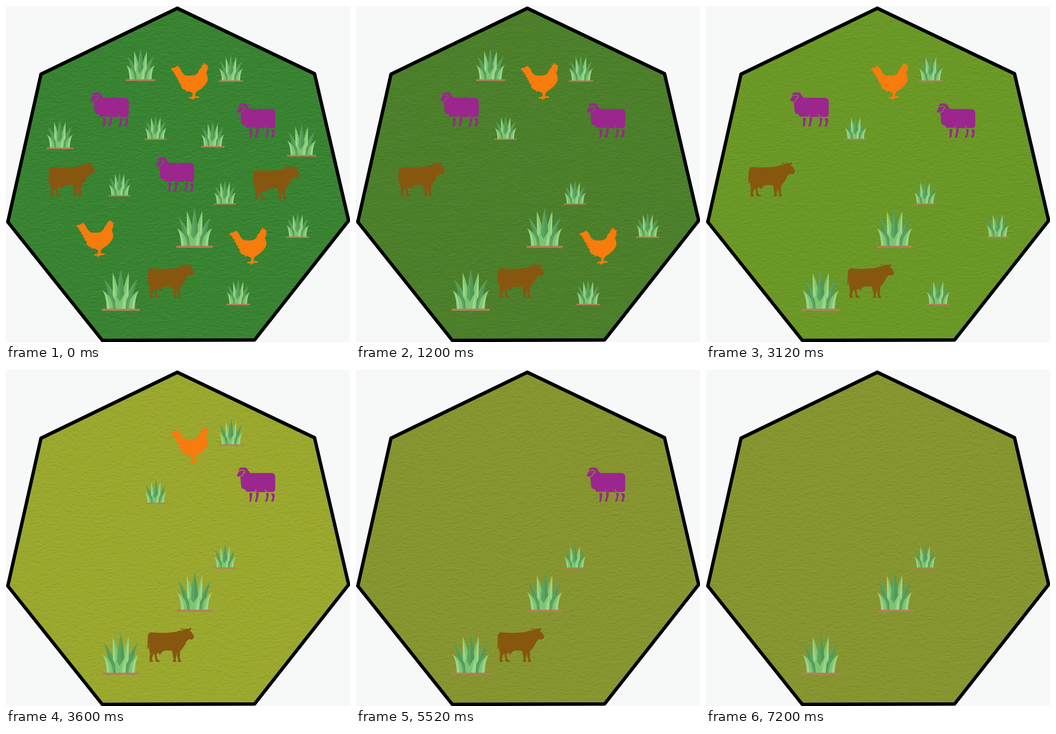
An HTML page with a canvas that plays this animation: 757 px wide and 739 px high, repeating every 8 s.

```html
<!DOCTYPE html>
<html lang="en">
<head>
<meta charset="utf-8">
<title>Pasture</title>
<style>
html, body { margin: 0; width: 100%; height: 100%; overflow: hidden; background: #f7f9f9; }
canvas { display: block; }
</style>
</head>
<body>
<canvas id="stage" width="757" height="739"></canvas>
<script>
const W = 757, H = 739, LOOP = 8000, STEP = 1200;
const canvas = document.getElementById('stage');
const ctx = canvas.getContext('2d');

const field = new Path2D('M377 5L679 149L754 472L547 734.5L212 735.5L4 475L77 150Z');
const stages = [
  { ground: '#388431', level: 0, relief: 1 },
  { ground: '#4c802a', level: 1, relief: 0.85 },
  { ground: '#6b9926', level: 2, relief: 0.85 },
  { ground: '#9ba92e', level: 3, relief: 0.9 },
  { ground: '#87962f', level: 4, relief: 0.9 },
  { ground: '#7b8732', level: 5, relief: 0.7 },
  { ground: '#87962f', level: 4, relief: 0.9 }
];

const species = {
  sheep: {
    color: '#9b268e',
    body: new Path2D(`M0 18L4 10L5 4Q7 0 11 0L19 0Q23 1 25 6L30 12H77Q85 13 85 21V47
      Q85 54 78 54H26Q19 54 19 48Q12 48 10 42L9 28L8 20L4 20Z
      M28 56H35L34 63L32 75H28L29 66Z M43 55H49L48 62L45 75H40L43 65Z
      M65 55L71 57L70 64L67 75H62L66 66Z M76 57H83L84 63L81 75H76L79 66Z`),
    gaps: new Path2D(`M4 8Q10 5 16 6Q20 8 17 12Q13 11 14 16Q12 19 8 20
      M20 54H36Q42 54 43 48 M62 48Q64 54 70 55H85`)
  },
  chicken: {
    color: '#f67c0d',
    body: new Path2D(`M0 15L4 11L8 11L14 7L18 8L22 14L25 20Q29 27 36 28L48 28Q57 27 60 22
      L63 15L68 10L69 7L68 4L72 5L72 1L74 0L76 4L79 1L79 7L83 4L82 10L81 12L84 15L80 16
      L81 21L78 21L80 26Q84 35 80 43L74 51L66 58L58 63L55 67L54 74L58 73L64 75L63 77L56 77
      L53 79L50 79L50 81L47 81L46 78L40 79L40 76L48 74L49 67L40 62L36 64L33 60L27 58
      L22 50L25 49L18 43L20 41L14 36L17 35L10 29L13 28L7 23L9 21L4 20L7 18Z`)
  },
  cow: {
    color: '#875710',
    body: new Path2D(`M1 24Q0 13 8 11L25 12L43 12L62 10L71 7L79 7L78 5L73 4L75 1L79 4L87 3
      L93 3L94 0L97 2L95 6L93 8L98 11L100 15L103 19L102 24L98 27L92 26L86 31L82 40L75 49
      L72 53L72 62L71 66L74 74L75 76H67L68 73L66 64L65 56L64 64L62 69L64 74L62 76H55
      L58 71L56 59L54 51L39 51L32 54L31 58L29 57L28 60L26 59L25 56L23 56L20 60L22 69
      L25 73L28 74L28 76H20L18 73L17 65L15 57L12 63L10 69L12 74L13 76H5L5 65L6 58L4 49
      L3 35L3 43L2 47L0 46Z`)
  }
};

// kind, x, y, last stage in which it is seen
const animals = [
  ['sheep', 185, 190, 2], ['sheep', 507.5, 214.5, 4], ['sheep', 329, 333, 0],
  ['chicken', 362, 125, 3], ['chicken', 154, 470.5, 0], ['chicken', 491, 487.5, 1],
  ['cow', 93, 343, 2], ['cow', 543, 350, 0], ['cow', 311, 566, 4]
];
// left, ground line, width, last level at which it grows
const tufts = [
  [263.5, 163, 65, 1], [468, 165, 54, 3], [305, 293, 49, 3], [429, 309.5, 52, 0],
  [89, 313, 59, 0], [618, 329.5, 65, 0], [225.5, 417.5, 49, 0], [457.5, 435.5, 49, 4],
  [375, 529.5, 80, 4], [616.5, 508.5, 51, 2], [485, 656.5, 52, 2], [211, 668, 83, 4]
];

const LIGHT = '#9bd68a', MID = '#7cc771', DARK = '#5ba461', DEEP = '#539858';

function halfBlade(side, base, width, bendX, bendY, tipX, tipY, color) {
  const edge = side * width / 2;
  ctx.fillStyle = color;
  ctx.beginPath();
  ctx.moveTo(base + edge, 0);
  ctx.quadraticCurveTo(bendX + edge, bendY, tipX, tipY);
  ctx.quadraticCurveTo(bendX, bendY, base, 0);
  ctx.fill();
}

function blade(base, width, bendX, bendY, tipX, tipY, left, right) {
  halfBlade(-1, base, width, bendX, bendY, tipX, tipY, left);
  halfBlade(1, base, width, bendX, bendY, tipX, tipY, right);
}

function mirrored(base, width, bendX, bendY, tipX, tipY, outer, inner) {
  blade(base, width, bendX, bendY, tipX, tipY, outer, inner);
  blade(80 - base, width, 80 - bendX, bendY, 80 - tipX, tipY, inner, outer);
}

function drawTuft([x, y, width]) {
  ctx.save();
  ctx.translate(x, y);
  ctx.scale(width / 80, width / 80);
  mirrored(27, 15, 21, -42, 4, -65, DEEP, DARK);
  mirrored(32, 15, 30, -45, 23, -79, LIGHT, MID);
  blade(40, 18, 40, -44, 40, -86, DARK, DEEP);
  mirrored(27, 10, 25, -25, 15, -38, DARK, DEEP);
  mirrored(17, 13, 16, -30, 1, -41, LIGHT, MID);
  mirrored(36, 13, 34, -18, 27, -31, MID, MID);
  blade(42, 15, 44, -20, 50, -36, MID, LIGHT);
  ctx.fillStyle = '#b77d5b';
  ctx.beginPath();
  ctx.roundRect(0, -2.2, 80, 4.4, 1.5);
  ctx.fill();
  ctx.restore();
}

function drawAnimal([kind, x, y], ground) {
  const { color, body, gaps } = species[kind];
  ctx.save();
  ctx.translate(x, y);
  ctx.fillStyle = color;
  ctx.fill(body);
  if (gaps) {
    ctx.strokeStyle = ground;
    ctx.lineWidth = 1.5;
    ctx.stroke(gaps);
  }
  ctx.restore();
}

function hash(x, y) {
  let n = Math.imul(x, 374761393) + Math.imul(y, 668265263);
  n = Math.imul(n ^ (n >>> 13), 1274126177);
  return ((n ^ (n >>> 16)) >>> 0) / 4294967296;
}

function noise(x, y) {
  const ix = Math.floor(x), iy = Math.floor(y);
  const ease = t => t * t * (3 - 2 * t);
  const u = ease(x - ix), v = ease(y - iy);
  const row = j => hash(ix, j) * (1 - u) + hash(ix + 1, j) * u;
  return row(iy) * (1 - v) + row(iy + 1) * v;
}

// Embossed paper grain: the vertical slope of a wide, flat noise
function makeRelief() {
  const layer = document.createElement('canvas');
  layer.width = W;
  layer.height = H;
  const c = layer.getContext('2d');
  const image = c.createImageData(W, H);
  const height = (x, y) => noise(x / 7, (y + x * 0.12) / 3.5) + 0.4 * noise(x / 3 + 90, y / 2 + 50);
  for (let y = 0, i = 0; y < H; y++) {
    for (let x = 0; x < W; x++, i += 4) {
      const slope = height(x, y + 1) - height(x, y);
      const shade = slope > 0 ? 255 : 0;
      image.data[i] = image.data[i + 1] = image.data[i + 2] = shade;
      image.data[i + 3] = Math.min(30, Math.abs(slope) * (shade ? 40 : 55));
    }
  }
  c.putImageData(image, 0, 0);
  return layer;
}

const relief = makeRelief();
let shown = -1;

function drawStage(index) {
  const { ground, level, relief: strength } = stages[index];
  ctx.fillStyle = '#f7f9f9';
  ctx.fillRect(0, 0, W, H);
  ctx.save();
  ctx.clip(field);
  ctx.fillStyle = ground;
  ctx.fillRect(0, 0, W, H);
  ctx.globalAlpha = strength;
  ctx.drawImage(relief, 0, 0);
  ctx.restore();
  ctx.strokeStyle = '#000';
  ctx.lineWidth = 7.5;
  ctx.lineJoin = 'round';
  ctx.stroke(field);
  tufts.filter(t => t[3] >= level).forEach(drawTuft);
  animals.filter(a => a[3] >= index).forEach(a => drawAnimal(a, ground));
}

function tick() {
  const index = Math.floor((performance.now() % LOOP) / STEP);
  if (index !== shown) drawStage(shown = index);
  requestAnimationFrame(tick);
}
tick();
</script>
</body>
</html>
```
